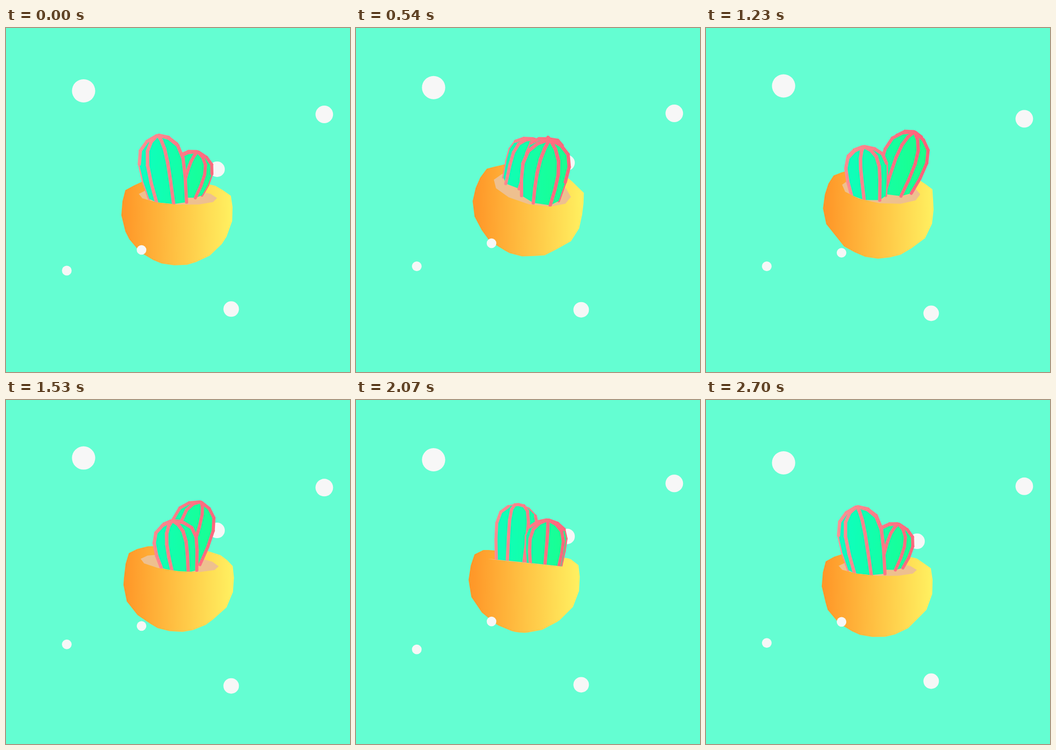
Write an HTML page with a canvas that moves like this. It is 665x665 px and loops after 2730 ms.

```html
<!DOCTYPE html>
<html lang="en">
<head>
<meta charset="utf-8">
<title>Spinning cactus pot</title>
<style>
  html, body { margin: 0; width: 100%; height: 100%; overflow: hidden; background: #64fed2; }
  canvas { display: block; width: 665px; height: 665px; }
</style>
</head>
<body>
<canvas id="stage" width="665" height="665"></canvas>
<script>
const ctx = document.getElementById('stage').getContext('2d');
const SIZE = 665, LOOP = 2730, STEP = 30, DEPTH = 900, RAD = Math.PI / 180;
const TIMES = [0, 270, 810, 1230, 1830, 2310];

// Pot pose at each key time
const POSE = {
  x: [330.5, 332, 335, 334.5, 329.5, 323.5],
  y: [360, 352, 336, 346, 351, 351],
  pitch: [14, 21, 26, 21, 7, 0],
  roll: [3, 6, 17, 7, 5.5, 6]
};

const DOTS = [
  { x: 408, r: 15, y: [273, 266.5, 255, 248, 258.5, 268.5] },
  { x: 150, r: 22.5, y: [121.5, 119, 112, 112, 113, 118.5] },
  { x: 615.3, r: 17, y: [167, 165.5, 166, 175.5, 162, 162.5] },
  { x: 117.5, r: 9.4, y: [469, 466.5, 456, 460.7, 482.5, 478] },
  { x: 435.3, r: 15, y: [543.3, 544, 546, 551.5, 552.3, 547.7] },
  { x: 262, r: 9.3, y: [429, 424, 412.5, 434.5, 434.3, 422.5] }
];

// [height, radius]
const BOWL = [[52, 85], [42, 101], [20, 106], [-8, 107.5], [-40, 99], [-68, 76], [-87, 48], [-97, 18]];
const CACTUS = [[0, .86], [.35, .97], [.62, 1], [.82, .85], [.94, .5], [1, .06]];
const SOIL = 33;
const PLANTS = [
  { at: -36, dist: 29, lean: 12, leanAt: -85, height: 120, radius: 42, ribAt: -35 },
  { at: 157, dist: 36, lean: 13, leanAt: 80, height: 88, radius: 39, ribAt: 36 }
];
const RIBS = 7;

// Periodic cubic interpolation through the key times
function track(vals, t) {
  const n = vals.length;
  const time = i => TIMES[(i + n) % n] + Math.floor(i / n) * LOOP;
  const val = i => vals[(i + n) % n];
  const slope = i => (val(i + 1) - val(i - 1)) / (time(i + 1) - time(i - 1));
  let i = n - 1;
  while (TIMES[i] > t) i--;
  const span = time(i + 1) - time(i), s = (t - time(i)) / span, s2 = s * s, s3 = s2 * s;
  return (2 * s3 - 3 * s2 + 1) * val(i) + (s3 - 2 * s2 + s) * span * slope(i)
    + (3 * s2 - 2 * s3) * val(i + 1) + (s3 - s2) * span * slope(i + 1);
}

const polar = (r, deg, y) => [r * Math.sin(deg * RAD), y, r * Math.cos(deg * RAD)];
const add = (a, b) => a.map((v, i) => v + b[i]);

function makeView(t) {
  const x0 = track(POSE.x, t), y0 = track(POSE.y, t);
  const p = track(POSE.pitch, t) * RAD, q = track(POSE.roll, t) * RAD;
  const turn = ([x, y, z]) => {
    const y1 = y * Math.cos(p) - z * Math.sin(p);
    return [x * Math.cos(q) + y1 * Math.sin(q), y1 * Math.cos(q) - x * Math.sin(q),
      y * Math.sin(p) + z * Math.cos(p)];
  };
  const project = v => {
    const [x, y, z] = turn(v), s = DEPTH / (DEPTH - z);
    return [x0 + x * s, y0 - y * s, s];
  };
  return { x0, turn, project };
}

function hull(points) {
  const sorted = [...points].sort((a, b) => a[0] - b[0] || a[1] - b[1]);
  const half = list => {
    const out = [];
    for (const c of list) {
      while (out.length > 1) {
        const [a, b] = out.slice(-2);
        if ((b[0] - a[0]) * (c[1] - a[1]) - (b[1] - a[1]) * (c[0] - a[0]) > 0) break;
        out.pop();
      }
      out.push(c);
    }
    return out.slice(0, -1);
  };
  return half(sorted).concat(half(sorted.reverse()));
}

function trace(points) {
  ctx.beginPath();
  points.forEach(p => ctx.lineTo(p[0], p[1]));
  ctx.closePath();
}

function fillShape(points, style) {
  trace(points);
  ctx.fillStyle = style;
  ctx.fill();
}

function across(x1, x2, from, to) {
  const g = ctx.createLinearGradient(x1, 0, x2, 0);
  g.addColorStop(0, from);
  g.addColorStop(1, to);
  return g;
}

function drawDot(dot, t) {
  ctx.beginPath();
  ctx.arc(dot.x, track(dot.y, t), dot.r, 0, 7);
  ctx.fillStyle = '#f7f7f7';
  ctx.fill();
}

function drawPlant(plant, spin, view) {
  const foot = polar(plant.dist, plant.at + spin, SOIL);
  const dir = polar(1, plant.leanAt + spin, 0);
  const c = Math.cos(plant.lean * RAD), s = Math.sin(plant.lean * RAD);
  const tilt = ([x, y, z]) => {
    const d = x * dir[0] + z * dir[2];
    const k = d * (c - 1) + y * s;
    return [x + dir[0] * k, y * c - d * s, z + dir[2] * k];
  };
  const all = [], front = [], back = [];
  for (let i = 0; i < RIBS; i++) {
    const deg = plant.ribAt + spin + i * 360 / RIBS;
    // The base stays flat on the soil
    const pts = CACTUS.map(([h, r]) => {
      const p = polar(r * plant.radius, deg, h * plant.height);
      return view.project(add(foot, h ? tilt(p) : p));
    });
    all.push(...pts);
    for (let j = 1; j < pts.length; j++) {
      const dh = (CACTUS[j][0] - CACTUS[j - 1][0]) * plant.height;
      const dr = (CACTUS[j][1] - CACTUS[j - 1][1]) * plant.radius;
      const normal = view.turn(tilt(polar(dh, deg, -dr)));
      (normal[2] > 0 ? front : back).push([pts[j - 1], pts[j]]);
    }
  }
  const drawRibs = (list, width) => {
    ctx.strokeStyle = across(250, 440, '#ff9395', '#ff5c76');
    for (const [a, b] of list) {
      ctx.lineWidth = width * a[2];
      ctx.beginPath();
      ctx.moveTo(a[0], a[1]);
      ctx.lineTo(b[0], b[1]);
      ctx.stroke();
    }
  };
  drawRibs(back, 5);
  fillShape(hull(all), across(255, 430, '#0cffc2', '#1cff88'));
  drawRibs(front, 6);
}

function draw(t) {
  const spin = 360 * t / LOOP, view = makeView(t);
  ctx.fillStyle = '#64fed2';
  ctx.fillRect(0, 0, SIZE, SIZE);
  DOTS.slice(0, -1).forEach(d => drawDot(d, t));

  const shell = [];
  for (const [h, r] of BOWL)
    for (let a = 0; a < 360; a += 30) shell.push(view.project(polar(r, a + spin, h)));
  fillShape(hull(shell), across(view.x0 - 100, view.x0 + 105, '#ff9829', '#fff060'));

  const hole = [];
  for (let a = -90; a < 270; a += 30) hole.push(view.project(polar(75, a, 36)));
  fillShape(hole, '#eec08f');

  // The front lip hides whatever is below it
  const lip = hole.slice(0, 7);
  ctx.save();
  trace([[0, 0], [0, lip[0][1]], ...lip, [SIZE, lip[6][1]], [SIZE, 0]]);
  ctx.clip();
  ctx.lineCap = ctx.lineJoin = 'round';
  const depth = p => p.dist * Math.cos((p.at + spin) * RAD);
  [...PLANTS].sort((a, b) => depth(a) - depth(b)).forEach(p => drawPlant(p, spin, view));
  ctx.restore();

  drawDot(DOTS[DOTS.length - 1], t);
}

const start = performance.now();
function tick() {
  const t = (performance.now() - start) % LOOP;
  draw(Math.floor(t / STEP) * STEP);
  requestAnimationFrame(tick);
}
tick();
</script>
</body>
</html>
```
